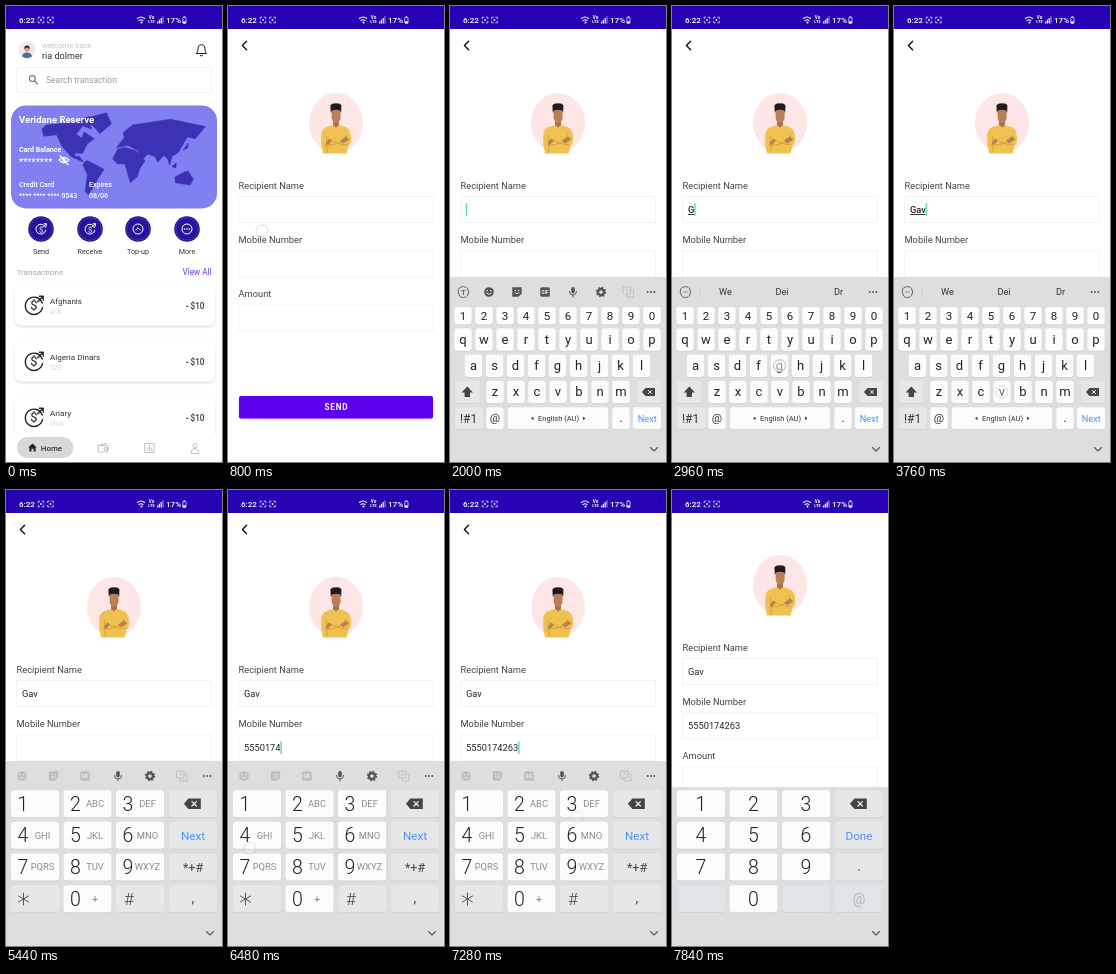
Animation, 216 px wide and 456 px high, one loop 8000 ms. Source, as an HTML page:

```html
<!DOCTYPE html>
<html>
<head>
<meta charset="utf-8">
<style>
html,body{margin:0;width:100%;height:100%;overflow:hidden;background:#fff}
svg{display:block;width:216px;height:456px}
text{font-family:Roboto,sans-serif;white-space:pre}
</style>
</head>
<body>
<svg id="stage" viewBox="0 0 216 456" xmlns="http://www.w3.org/2000/svg"></svg>
<script>
const LOOP = 8000;
const stage = document.getElementById('stage');

// markup helpers
const text = (x, y, s, size, fill = '#222', extra = '') =>
  `<text x="${x}" y="${y}" font-size="${size}" fill="${fill}" ${extra}>${s}</text>`;
const mid = (x, cy, s, size, fill = '#222', extra = '') =>
  text(x, cy + size * .36, s, size, fill, 'text-anchor="middle" ' + extra);
const rect = (x, y, w, h, r, fill, extra = '') =>
  `<rect x="${x}" y="${y}" width="${w}" height="${h}" rx="${r}" fill="${fill}" ${extra}/>`;
const circle = (x, y, r, fill, extra = '') =>
  `<circle cx="${x}" cy="${y}" r="${r}" fill="${fill}" ${extra}/>`;
const path = (d, fill = 'none', extra = '') => `<path d="${d}" fill="${fill}" ${extra}/>`;
const line = (d, color, w = 1) =>
  path(d, 'none', `stroke="${color}" stroke-width="${w}" stroke-linecap="round" stroke-linejoin="round"`);
const at = (x, y, body, scale = 1) => `<g transform="translate(${x} ${y}) scale(${scale})">${body}</g>`;
const group = (id, body) => `<g id="${id}">${body}</g>`;
const bold = 'font-weight="700"', semi = 'font-weight="500"', thin = 'font-weight="300"';

const focusIcon = x => at(x, 14,
  line('M-2.8-1.2V-2.8H-1.2M1.2-2.8H2.8V-1.2M2.8 1.2V2.8H1.2M-1.2 2.8H-2.8V1.2', '#fff', .7) +
  circle(0, 0, .9, '#fff'));

function statusBar() {
  return rect(0, 0, 216, 23, 0, '#2803b5') +
    text(13, 16.9, '6:22', 8.1, '#fff', semi) + focusIcon(35) + focusIcon(44.5) +
    line('M131.5 12.5Q135 9.5 138.5 12.5M133 14.6Q135 13 137 14.6', '#fff', 1.1) + circle(135.5, 16.4, 1, '#fff') +
    mid(145.6, 11.8, 'Vo', 4.6, '#fff', bold) + mid(145.6, 15.9, 'LTE', 4, '#fff', bold) +
    path('M151 17.5V15.5H152.2V17.5ZM152.8 17.5V13.7H154V17.5ZM154.6 17.5V12H155.8V17.5Z', '#fff') +
    path('M156.4 17.5V10.3H157.6V17.5Z', '#fff', 'opacity=".5"') +
    text(160, 16.9, '17%', 8.1, '#fff', semi) +
    rect(176.8, 11.4, 3.2, 6, .6, 'none', 'stroke="#fff" stroke-width=".7"') +
    rect(177.6, 10.4, 1.6, 1, 0, '#fff') + rect(177, 15.4, 2.8, 1.8, 0, '#fff');
}

const coin = (x, y, scale, color, w) => at(x, y,
  line('M7.6-2.2A8 8 0 1 0 7.8 2M3.5-3.5L8.5-8.5M5-8.5H8.5V-5', color, w) + mid(0, 0, '$', 12, color), scale);

// coastlines as longitude,latitude, drawn in the Miller projection
const lands = [
  '-166,66 -156,71 -95,74 -66,80 -62,66 -80,70 -94,59 -82,53 -77,62 -56,52 -70,44 -81,26 -97,27 -96,19 -88,21 -78,8 -105,20 -124,40 -135,58 -162,56',
  '-73,78 -30,83 -20,72 -44,60',
  '-80,2 -72,12 -50,1 -35,-7 -48,-26 -68,-55 -75,-48 -70,-18',
  '-17,15 -6,35 10,37 32,31 51,11 40,-5 35,-22 20,-34 9,4 -8,5',
  '-9,37 8,54 5,61 25,71 105,77 178,69 157,52 140,55 128,38 121,28 108,20 103,2 98,16 90,22 78,8 72,20 57,25 45,13 35,32 15,41',
  '114,-23 135,-12 142,-11 153,-28 146,-38 115,-34',
  '131,32 142,45 141,36', '108,-1 117,6 116,-4'
];
const project = (lon, lat) => [
  34 + (lon + 170) * .475,
  160 - 34 * Math.log(Math.tan(Math.PI / 4 + lat * Math.PI / 450))
].map(v => v.toFixed(1)).join(' ');

function worldMap() {
  const outline = land => 'M' + land.split(' ').map(p => project(...p.split(',').map(Number))).join('L') + 'Z';
  return path(lands.map(outline).join(''), '#3c32b4', 'stroke="#3c32b4" stroke-width=".6" stroke-linejoin="round"');
}

const action = (x, label, icon) =>
  circle(x, 223, 12.8, '#24149c') + circle(x, 223, 11.2, 'none', 'stroke="#5a4ec4" stroke-width=".5"') +
  icon + mid(x, 245.5, label, 7.2, '#333');

const row = (y, name, code) =>
  rect(8.5, y, 200, 40, 6, '#fff', 'filter="url(#soft)"') +
  coin(28, y + 20, 1.08, '#222', 1.3) + text(44, y + 18.2, name, 8.1, '#333') +
  text(44, y + 28, code, 6.4, '#c4c4c4', thin) + text(198.5, y + 23.2, '- $10', 8.2, '#333', semi + ' text-anchor="end"');

function home() {
  const ring = x => circle(x, 223, 5, 'none', 'stroke="#fff" stroke-width="1"');
  return rect(0, 0, 216, 456, 0, '#fff') +
    circle(21, 44, 8.5, '#f8e6e3') +
    path('M16 50.5Q16.5 46.5 21 46.5Q25.5 46.5 26 50.5Q21 54 16 50.5Z', '#4d6f9c') + circle(21, 43.4, 2.4, '#d99a80') +
    path('M18.4 43.6Q17.8 39.4 21 39.4Q24.2 39.4 23.6 43.6Q23 41.6 21 41.6Q19 41.6 18.4 43.6Z', '#27232b') +
    text(36, 41.7, 'welcome back', 7.9, '#a8a8a8', thin) + text(36, 52.6, 'ria dolmer', 9.1, '#333') +
    line('M190.5 47.5H200.5Q199 46 199 43Q199 38.7 195.5 38.7Q192 38.7 192 43Q192 46 190.5 47.5ZM194.3 49.6Q195.5 50.6 196.7 49.6', '#222') +
    rect(10.5, 61.5, 195, 25, 1, '#fff', 'stroke="#f2f2f2"') +
    circle(26.3, 72.6, 2.9, 'none', 'stroke="#777" stroke-width="1.2"') + line('M28.6 75L31.3 77.7', '#777', 1.3) +
    text(40, 77.3, 'Search transaction', 8.5, '#999') +
    rect(5, 99.5, 206, 103, 15, '#8080f0') + worldMap() +
    text(13, 117, 'Veridane Reserve', 9.5, '#fff', bold) +
    text(13, 146, 'Card Balance', 7.1, '#fff', bold) + text(13, 158.7, '********', 9.2, '#fff', bold) +
    line('M53 154Q58 149 63 154Q58 159 53 154ZM54 149.5L62 158.5', '#fff', 1.2) + circle(58, 154, 1.6, '#fff') +
    text(13, 180.6, 'Credit Card', 7, '#fff', semi) + text(13, 192.3, '**** **** **** 0543', 7, '#fff', semi) +
    text(83, 180.6, 'Expires', 7, '#fff', semi) + text(83, 192.3, '08/06', 7.2, '#fff', semi) +
    action(35, 'Send', coin(35, 223, .62, '#fff', 1.6)) +
    action(84, 'Receive', coin(84, 223, .62, '#fff', 1.6)) +
    action(132, 'Top-up', ring(132) + line('M129.8 224L132 221.8L134.2 224', '#fff')) +
    action(181, 'More', ring(181) + [-2.2, 0, 2.2].map(d => circle(181 + d, 223, .8, '#fff')).join('')) +
    text(10.5, 269.3, 'Transactions', 8.1, '#a5a5a5') + text(205.5, 269.3, 'View All', 8.2, '#6a38e4', 'text-anchor="end"') +
    row(279.5, 'Afghanis', 'AFA') + row(335.5, 'Algeria Dinars', 'DZD') + row(391.5, 'Ariary', 'MGA') +
    rect(0, 428, 216, 28, 0, '#fff') + rect(11, 431, 56.5, 21, 10.5, '#d8d8d8') +
    path('M22.3 441.6L26.5 437.6L30.7 441.6H29.6V445.6H27.5V442.8H25.5V445.6H23.4V441.6Z', '#222') +
    text(34.8, 444.6, 'Home', 7.9, '#333', semi) +
    line('M92.5 439.5H101.5V446H92.5ZM93 439.3L99.5 437.3V439M98.5 441.8H102.3V444H98.5Z', '#b0b0b0', .8) +
    line('M139 437.5H148V446.5H139ZM141.3 444.5V441.5M143.5 444.5V439.5M145.7 444.5V442.5', '#b0b0b0', .8) +
    line('M185.3 447Q185 442.5 189 442.5Q193 442.5 192.7 447Z', '#b0b0b0', .8) + circle(189, 439.5, 2, 'none', 'stroke="#b0b0b0" stroke-width=".8"');
}

function portrait() {
  return `<ellipse cx="108" cy="117" rx="27" ry="30" fill="#fde6e5"/>` +
    path('M105 110H111V120L108 122.5L105 120Z', '#a86f4b') +
    path('M103.6 103H112.6V111.5Q111.6 117 108.1 117Q104.6 117 103.6 111.5Z', '#b97f59') +
    path('M102.8 107L102.4 99.3Q104.4 97 108 97.4Q112 97 113.4 99.3L113.2 107L112.2 104.4Q108 103 104 104.4Z', '#1f1c20') +
    path('M95 147.5Q92.5 139 93.2 130Q93.6 122.5 98.5 121L105 119L108 121.5L111 119L117.5 121Q122 122.5 123 130Q124 136 120.5 140L118.5 147.5Z', '#eec150') +
    line('M98.6 130L99 146M117.4 129L118 133M97 139Q106 140 115 134.5M101 133Q110 139 119 138.5', '#c9992f', .7) +
    path('M112 134.5L118 130.5L121.5 133.5L115 137.5ZM97.5 137L101 132.8L104 134.5L100 139Z', '#b97f59');
}

const labels = [['Recipient Name', 182.7], ['Mobile Number', 237], ['Amount', 291.3]];
function form() {
  return rect(0, 0, 216, 500, 0, '#fff') + line('M18.6 35.2L14.4 39.5L18.6 43.8', '#111', 1.4) + portrait() +
    labels.map(([s, y]) => text(10.5, y, s, 9.3, '#444') +
      rect(10.5, y + 7.8, 195, 26, 0, '#fff', 'stroke="#f3f3f3"')).join('') +
    text(16, 207, '', 9.3, '#222', 'id="nameText"') + text(16, 261.3, '', 9.3, '#222', 'id="phoneText"') +
    `<g id="caret">${rect(-.4, -9.8, 2, 12.5, 0, '#b5efe9')}${rect(0, -9.8, 1, 12.5, 0, '#5ad3c9')}</g>` +
    rect(11, 390, 194, 22.5, 2, '#5c00ee', 'filter="url(#soft)"') +
    mid(108.4, 401.3, 'SEND', 8.2, '#fff', bold + ' letter-spacing=".7"');
}

// keyboards
const KEY = '#fcfcfc', FUNC = '#e6e7e8', BG = '#dddedf', BLUE = '#4c93f4', PALE = '#bcbec0';
const key = (cx, cy, w, h, fill = KEY) => rect(cx - w / 2, cy - h / 2 + .7, w, h, 3, '#cccecf') + rect(cx - w / 2, cy - h / 2, w, h, 3, fill);
const back = (x, y, scale = 1) => at(x, y,
  path('M-7 0L-3.5-4H6V4H-3.5Z', '#444') + line('M-.8-1.7L2.6 1.7M2.6-1.7L-.8 1.7', '#eee', 1), scale);
const chevron = line('M200.5 441.5L204 445L207.5 441.5', '#555', 1.1);
const dots = [-3.3, 0, 3.3].map(d => circle(201 + d, 286, 1, '#555')).join('');

const icons = {
  smile: c => circle(0, 0, 4.8, c) + circle(-1.7, -1.2, .8, '#eee') + circle(1.7, -1.2, .8, '#eee') + line('M-2.3 1.3Q0 3.6 2.3 1.3', '#eee', .9),
  sticker: c => path('M-4.7-4.7H4.7V1.5L1.5 4.7H-4.7Z', c) + line('M-2 .8Q0 2.8 2 .8', '#eee', .9) + circle(-1.6, -1.5, .7, '#eee') + circle(1.6, -1.5, .7, '#eee'),
  gif: c => rect(-4.8, -4.8, 9.6, 9.6, 1.5, c) + mid(0, 0, 'GIF', 4.6, '#eee', bold),
  mic: c => rect(-1.8, -5, 3.6, 6.4, 1.8, c) + line('M-3.6-.5Q-3.4 3 0 3Q3.4 3 3.6-.5M0 3V5', c, 1),
  gear: c => circle(0, 0, 3, 'none', `stroke="${c}" stroke-width="2.4"`) + circle(0, 0, 4.5, 'none', `stroke="${c}" stroke-width="1.4" stroke-dasharray="1.77"`),
  copy: c => line('M-5-5H2V2H-5ZM2-2H5V5H-2V2', c, .9) + mid(-1.5, -1.5, 'A', 5, c)
};
const tools = (xs, colors) => Object.values(icons).map((draw, i) => at(xs[i], 286, draw(colors[i]))).join('') + dots;

const rows = [['1234567890', 13, 309.8, 17.5], ['qwertyuiop', 13, 333.6, 22.5], ['asdfghjkl', 23.5, 359.8, 22.5], ['zxcvbnm', 45, 386, 22.5]];
const spots = {};
function letters() {
  return rect(0, 271, 216, 185, 0, BG) +
    line('M9 282Q6.8 286 9.5 290M17.5 282Q20 286 17.5 290M10.5 281.2Q13.5 279.8 16 281.2M10.5 291Q13.5 292.4 16 291', '#666', 1) +
    group('tee', mid(13.3, 286, 'T', 8, '#444')) + group('dash', line('M11.5 286H15.3', '#888', 1)) +
    group('toolbar', tools([39, 67, 95, 123, 151, 178.5], ['#555', '#555', '#555', '#555', '#555', PALE])) +
    group('hints', mid(53.5, 286, 'We', 9.2, '#333') + mid(110, 286, 'Dei', 9.2, '#333') + mid(166.5, 286, 'Dr', 9.2, '#333') +
      line('M28 281V291', '#c5c5c5', .6) + dots) +
    rows.map(([chars, x0, y, h]) => [...chars].map((ch, i) => {
      const x = x0 + i * 21;
      spots[ch] = [x, y];
      return key(x, y, 17.4, h) + mid(x, y - .4, ch, h < 20 ? 11.5 : 13, '#222', h < 20 ? '' : 'class="cap"');
    }).join('')).join('') +
    key(17.3, 386, 25, 22.5, FUNC) + path('M17.3 380.5L23 386.5H20V391H14.6V386.5H11.6Z', '#444') +
    key(199, 386, 24.5, 22.5, FUNC) + back(199, 386) +
    key(19, 412.3, 28, 22, FUNC) + mid(18.6, 412.3, '!#1', 12, '#333') + key(45, 412.3, 17.4, 22) + mid(45, 412.3, '@', 11.5, '#333') +
    key(108, 412.3, 100.5, 22) + mid(108.5, 412.3, 'English (AU)', 7.5, '#333') +
    path('M83.5 410.8V414L81 412.4ZM133 410.8V414L135.5 412.4Z', '#333') +
    key(171, 412.3, 17.4, 22) + mid(171, 411, '.', 13) + key(197, 412.3, 28, 22) + mid(197.3, 412.3, 'Next', 9.2, BLUE) + chevron;
}

const cols = [29, 81.5, 134, 187], lines = [313.8, 345.3, 377, 408.8];
const padSpot = d => d === '0' ? [cols[1], lines[3]] : [cols[(d - 1) % 3], lines[Math.floor((d - 1) / 3)]];
const grid = fill => lines.map((y, r) => cols.map((x, c) => key(x, y, 48, 27, fill(r, c))).join('')).join('');
const digit = (x, y, d) => mid(x, y, d, 19.5, '#222', thin);
const words = ['', 'ABC', 'DEF', 'GHI', 'JKL', 'MNO', 'PQRS', 'TUV', 'WXYZ'];

function phonePad() {
  return rect(0, 271, 216, 185, 0, BG) +
    tools([16, 47.5, 79, 112, 144, 176], [PALE, PALE, PALE, '#555', '#555', PALE]) +
    grid((r, c) => c === 3 || (r === 3 && c !== 1) ? FUNC : KEY) +
    words.map((w, i) => {
      const [x, y] = padSpot(i + 1);
      return digit(x - 12, y, i + 1) + mid(x + 7.5, y, w, 9.4, '#8a8a8a');
    }).join('') +
    line('M17.5 403V415M12.5 406L22.5 412M22.5 406L12.5 412', '#555', 1) +
    digit(69.5, lines[3], '0') + mid(89, lines[3], '+', 11, '#8a8a8a') + mid(123, lines[3], '#', 17, '#444', thin) +
    back(187, lines[0], 1.3) + mid(187, lines[1], 'Next', 11.7, BLUE) + mid(187, lines[2], '*+#', 12.5, '#444') + mid(187, lines[3] - 1, ',', 14, '#444') + chevron;
}

function amountPad() {
  return rect(0, 297, 216, 159, 0, BG) + grid((r, c) => r === 3 && c !== 1 ? '#e0e4e6' : c === 3 ? FUNC : KEY) +
    words.map((w, i) => digit(...padSpot(i + 1), i + 1)).join('') + digit(cols[1], lines[3], '0') +
    back(187, lines[0], 1.3) + mid(187, lines[1], 'Done', 11.7, BLUE) + mid(187, lines[2] - 1, '.', 14, '#444') + mid(187, lines[3], '@', 14, '#b0b3b5') + chevron;
}

stage.innerHTML =
  '<defs><filter id="soft" x="-10%" y="-20%" width="120%" height="150%"><feDropShadow dx="0" dy=".9" stdDeviation="1" flood-color="#000" flood-opacity=".2"/></filter></defs>' +
  group('home', home()) + group('form', form()) + group('letters', letters()) + group('phonePad', phonePad()) +
  group('amountPad', amountPad()) + group('status', statusBar()) +
  circle(0, 0, 6, '#fff', 'id="touch" fill-opacity=".55" stroke="#b4b4d4" stroke-width="1"');

const el = {};
stage.querySelectorAll('[id]').forEach(n => el[n.id] = n);
const caps = [...stage.querySelectorAll('.cap')].map(n => [n, n.textContent]);

// timeline
const person = 'Gav', nameTimes = [2960, 3280, 3600];
const phone = '5550174263';
const phoneTimes = [...phone].map((_, i) => i < 7 ? 5700 + i * 125 : 6720 + (i - 7) * 250);
const tap = (t, hold, x, y) => ({ t, hold, x, y });
const padTap = (t, d) => {
  const [x, y] = padSpot(d);
  return tap(t - 100, 40, x - 7, y + 13);
};
const taps = [
  tap(160, 560, 34, 225), tap(1440, 200, 100, 203), tap(2560, 140, 17, 386),
  ...nameTimes.map((t, i) => tap(t - 40, 130, ...spots[person[i].toLowerCase()])),
  tap(3880, 100, 204, 443), tap(4560, 180, 162, 265.5),
  ...phoneTimes.map((t, i) => padTap(t, phone[i])),
  tap(7400, 90, 187, 345)
];

const clamp = v => Math.max(0, Math.min(1, v));
const ease = (t, a, b) => 1 - Math.pow(1 - clamp((t - a) / (b - a)), 3);
const show = (n, on) => n.style.display = on ? '' : 'none';
const shift = (n, x, y) => n.setAttribute('transform', `translate(${x} ${y})`);
const typed = (times, t) => times.filter(k => t >= k).length;

function render(t) {
  const open = ease(t, 600, 780);
  show(el.home, open < 1);
  show(el.form, open > 0);
  el.form.setAttribute('opacity', open);
  shift(el.form, 0, 24 * (1 - open) - 22 * ease(t, 7500, 7740));

  const n = typed(nameTimes, t), p = typed(phoneTimes, t);
  el.nameText.textContent = person.slice(0, n);
  el.phoneText.textContent = phone.slice(0, p);
  const composing = t < 3920;
  el.nameText.setAttribute('font-weight', composing ? 500 : 400);
  el.nameText.setAttribute('text-decoration', composing ? 'underline' : 'none');

  const onPhone = t >= 4700;
  const field = onPhone ? el.phoneText : el.nameText;
  const last = Math.max(...[1600, 4700, ...nameTimes, ...phoneTimes].filter(k => k <= t), 0);
  show(el.caret, t >= 1600 && t < 7480 && (t - last) % 1000 < 500);
  const width = (onPhone ? p : n) ? field.getComputedTextLength() : 0;
  shift(el.caret, 16 + width, onPhone ? 261.3 : 207);

  show(el.letters, t >= 1580 && t < 4300);
  shift(el.letters, 0, 186 * (1 - ease(t, 1580, 1920) + Math.pow(clamp((t - 3920) / 320), 2)));
  show(el.toolbar, n < 1);
  show(el.tee, n < 1);
  show(el.hints, n > 0);
  show(el.dash, n > 0);
  const upper = t >= 2600 && n < 1;
  caps.forEach(([node, ch]) => node.textContent = upper ? ch.toUpperCase() : ch);

  show(el.phonePad, t >= 4760 && t < 7500);
  shift(el.phonePad, 0, 186 * (1 - ease(t, 4760, 5100)));
  show(el.amountPad, t >= 7500);

  const hit = taps.filter(k => t >= k.t && t < k.t + k.hold + 160).pop();
  show(el.touch, hit);
  if (hit) {
    shift(el.touch, hit.x, hit.y);
    el.touch.setAttribute('opacity', 1 - clamp((t - hit.t - hit.hold) / 160));
  }
}

const start = performance.now();
function tick() {
  render((performance.now() - start) % LOOP);
  requestAnimationFrame(tick);
}
tick();
</script>
</body>
</html>
```
